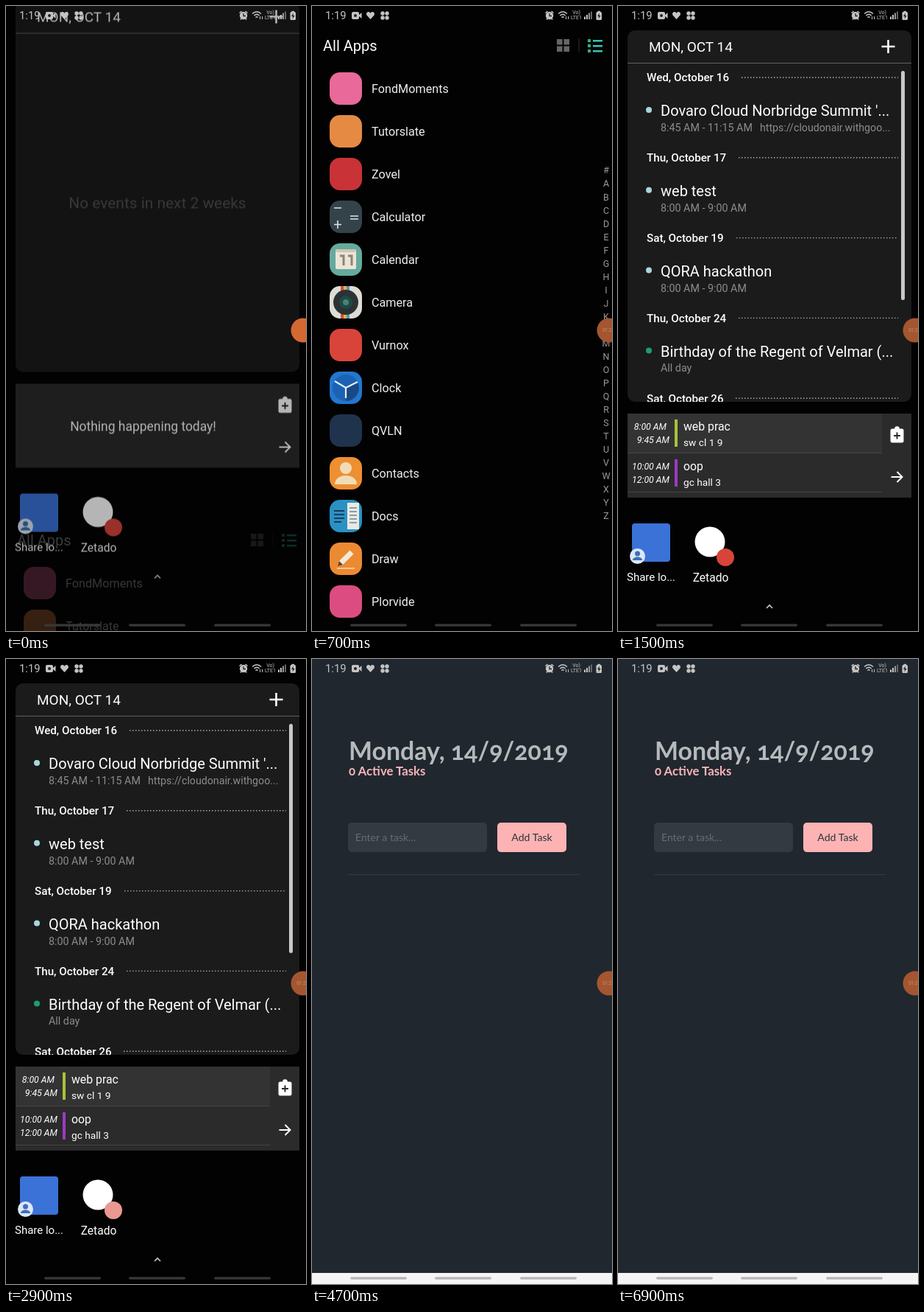
These frames come from a looping animation (408x848 px, 7100 ms). An HTML page:

```html
<!DOCTYPE html>
<html lang="en">
<head>
<meta charset="utf-8">
<style>
html, body { margin: 0; width: 100%; height: 100%; overflow: hidden; background: #030203; }
svg { display: block; width: 408px; height: 848px; font-family: Roboto, sans-serif; }
.page { font-family: Lato, sans-serif; font-variant-numeric: oldstyle-nums; }
</style>
</head>
<body>
<svg id="stage" viewBox="0 0 408 848"></svg>
<script>
const LOOP = 7100;

// Shape helpers; text is placed by the middle of its capitals.
const text = (x, y, size, str, fill = '#fff', more = '') =>
  `<text x="${x}" y="${y + size * 0.355}" font-size="${size}" fill="${fill}" ${more}>${str}</text>`;
const rect = (x, y, w, h, fill, r = 0) =>
  `<rect x="${x}" y="${y}" width="${w}" height="${h}" rx="${r}" fill="${fill}"/>`;
const dot = (x, y, r, fill) => `<circle cx="${x}" cy="${y}" r="${r}" fill="${fill}"/>`;
const line = (d, stroke, width = 1, more = '') =>
  `<path d="${d}" fill="none" stroke="${stroke}" stroke-width="${width}" ${more}/>`;
const shape = (d, fill) => `<path d="${d}" fill="${fill}"/>`;
const group = (id, body, more = '') => `<g id="${id}" ${more}>${body}</g>`;
const MIDDLE = 'text-anchor="middle"', END = 'text-anchor="end"';

// Icon art is drawn around the centre of its tile.
const apps = [
  ['FondMoments', '#e8699a'],
  ['Tutorslate', '#e58a43'],
  ['Zovel', '#c93236'],
  ['Calculator', '#34434a', line('M-16-12h10M-11 5v11M-16 10.5h10M6-1h11M6 3h11', '#dfe5e3', 1.6)],
  ['Calendar', '#65aa9d', rect(-14, -14, 28, 27, '#ece5d6', 2) + rect(-14, -14, 28, 4, '#cfc6b4', 2) +
    line('M-8-5h5V8M3-5h5V8', '#8b8478', 3)],
  ['Camera', '#dfdcd8', rect(-7, -22, 4, 44, '#d0503c') + rect(-3, -22, 4, 44, '#e4b341') +
    rect(1, -22, 4, 44, '#4c9ab5') + dot(0, 0, 17, '#2c3234') + dot(0, 0, 9, '#1d4b46') + dot(0, 0, 4, '#4a8274')],
  ['Vurnox', '#d8443a'],
  ['Clock', '#2277cf', dot(0, 0, 18, '#1c62b3') + shape('M0 0L16-8A18 18 0 0 1 0 18Z', '#174a86') +
    line('M-15-9L0 0L16-8M0 0V14', '#e5eef5', 2.2)],
  ['QVLN', '#20334d'],
  ['Contacts', '#ee8f31', dot(0, -7, 8, '#f2dcb7') + shape('M-15 15C-15-1 15-1 15 15Z', '#f2dcb7')],
  ['Docs', '#2a91c4', rect(2, -18, 16, 36, '#ece9e2') +
    line('M-16-7H-2M-16-2H-2M-16 3H-2M-16 8H-6', '#183c59', 2) +
    line('M5-11H15M5-6H15M5-1H15M5 4H15M5 9H15', '#65869a', 1.5)],
  ['Draw', '#ec8a32', line('M-7 6L8-9', '#f4ead7', 7) + shape('M-11 10L-9 3L-4 8Z', '#5b473d') +
    line('M-12 13H12', '#f6dcae', 1.5)],
  ['Plorvide', '#dc4c80'],
];

const drawer = () => {
  const rows = apps.map(([name, color, art = ''], i) => {
    const y = 112 + 58 * i;
    return `<g transform="translate(46 ${y})">${rect(-22, -22, 44, 44, color, 14)}${art}</g>` +
      text(81, y, 16.2, name, '#eee');
  });
  const tiles = [[333, 45], [342.5, 45], [333, 54.5], [342.5, 54.5]].map(([x, y]) => rect(x, y, 7.5, 7.5, '#666'));
  const list = [46, 53, 60].map(y => rect(375, y - 1, 4, 4, '#2fae8f') + rect(382, y, 13, 2.5, '#38c3b4'));
  return text(15, 54, 20, 'All Apps') + tiles.join('') + rect(362.5, 44, 1, 18, '#333') + list.join('') + rows.join('');
};

const letters = () => [...'#ABCDEFGHIJKLMNOPQRSTUVWXYZ']
  .map((c, i) => text(400, 223 + 18.04 * i, 12.5, c, '#999', MIDDLE)).join('');

const days = [
  ['Wed, October 16', 168, '#a9d5e2', "Dovaro Cloud Norbridge Summit '...", '8:45 AM - 11:15 AM',
    'https://cloudonair.withgoo...'],
  ['Thu, October 17', 164, '#a9d5e2', 'web test', '8:00 AM - 9:00 AM'],
  ['Sat, October 19', 161, '#a9d5e2', 'QORA hackathon', '8:00 AM - 9:00 AM'],
  ['Thu, October 24', 164, '#1f9d6c', 'Birthday of the Regent of Velmar (...', 'All day'],
  ['Sat, October 26', 160],
];
const agenda = () => days.map(([day, start, color, title, time, link = ''], i) => {
  const y = 97 + 108.8 * i;
  return text(39, y, 15.2, day, '#fff', 'font-weight="500"') +
    line(`M${start} ${y}H381`, '#aaa', 1.4, 'stroke-dasharray="1.5 2.5"') +
    (title ? dot(42, y + 44, 4, color) + text(58, y + 45, 20, title) +
      text(58, y + 68, 14.3, time, '#8c8c8c') + text(193, y + 68, 14.2, link, '#8c8c8c') : '');
}).join('') + rect(385, 88, 5, 311, '#c8c8c8', 2.5);

const lesson = (y, color, from, to, right, name, room) =>
  text(right, y, 12.3, from, '#fff', END + ' font-style="italic"') +
  text(70, y + 18, 12.3, to, '#fff', END + ' font-style="italic"') +
  rect(77, y - 10, 4, 37, color) + text(89, y - 1, 15.8, name) + text(89, y + 21, 13.7, room);

const today = () => rect(13, 553, 346, 54, '#333') + rect(13, 606, 346, 1, '#444') + rect(13, 659, 346, 1, '#444') +
  lesson(571, '#a6c23b', '8:00 AM', '9:45 AM', 66, 'web prac', 'sw cl 1 9') +
  lesson(625, '#9a3bc4', '10:00 AM', '12:00 AM', 70, 'oop', 'gc hall 3');

const home = () =>
  `<clipPath id="card">${rect(13, 33, 386, 504, '#000', 10)}</clipPath>` +
  rect(13, 33, 386, 504, '#1b1b1b', 10) +
  text(42, 55, 19, 'MON, OCT 14') + line('M358.5 55H376.5M367.5 46V64', '#fff', 2.6) +
  rect(13, 77, 386, 1, '#5c6266') +
  rect(13, 553, 386, 114, '#2b2b2b') +
  group('empty', text(206, 308, 20.9, 'No events in next 2 weeks', '#505050', MIDDLE) +
    text(186.5, 611, 17.45, 'Nothing happening today!', '#fff', MIDDLE)) +
  group('events', `<g clip-path="url(#card)">${agenda()}</g>` + today()) +
  rect(370.5, 573.5, 18, 19, '#fff', 2.5) + dot(379.5, 573.5, 3.3, '#fff') +
  line('M375 583H384M379.5 578.5V587.5', '#2b2b2b', 2) +
  line('M371.5 639H386M379.5 632L386.5 639L379.5 646', '#fff', 2) +
  rect(19, 702, 52, 52, '#3b72d8', 4) +
  dot(26.5, 746.5, 10.5, '#dbe8f8') + dot(26.5, 743, 3.5, '#3f6fb5') +
  shape('M20 752C20 746 33 746 33 752Z', '#3f6fb5') +
  dot(125, 727, 20.5, '#fff') + dot(146, 748, 12, '#d8443a') +
  group('press', dot(146, 748, 12, '#fff')) +
  text(45, 775, 15, 'Share lo...', '#fff', MIDDLE) + text(126, 775, 15.6, 'Zetado', '#fff', MIDDLE) +
  line('M202 817L206 813L210 817', '#ccc', 1.6);

const splash = () => rect(0, 24, 408, 809, '#212830') + rect(0, 833, 408, 15, '#f5f5f5') +
  dot(205, 412, 23.5, '#fff') + text(206, 768, 23.2, 'Zetado', '#fff', MIDDLE);

const page = () => rect(0, 0, 408, 833, '#20272e') + rect(0, 833, 408, 15, '#f5f5f5') +
  text(50, 125, 33.9, 'Monday, 14/9/2019', '#b6babd', 'font-weight="700"') +
  text(50, 152, 16.8, '0 Active Tasks', '#f8b5ba', 'font-weight="700"') +
  rect(49, 222, 189, 40, '#343a41', 5) + text(59, 242, 14, 'Enter a task...', '#666c72') +
  rect(252, 222, 94, 40, '#fdb3b4', 5) + text(299, 242, 14.1, 'Add Task', '#2d3339', MIDDLE) +
  rect(49, 292, 315, 1, '#303d4a');

const status = () => {
  const c = '#c4c4c4';
  return text(18, 13, 14.8, '1:19', c) +
    rect(54, 8, 10, 10, c, 2) + shape('M63 13L67.5 9V17Z', c) + dot(59, 13, 2, '#222') +
    shape('M79.5 18L74.5 12.5C72.5 9 77.5 6 79.5 9.7C81.5 6 86.5 9 84.5 12.5Z', c) +
    [[96, 10], [102, 10], [96, 16], [102, 16]].map(([x, y]) => dot(x, y, 2.7, c)).join('') +
    dot(323, 13, 5.2, c) + line('M323 10V13.5H326', '#222', 1.3) +
    line('M317.5 9.5L320.5 7M328.5 9.5L325.5 7M319 18.5L320 17M327 18.5L326 17', c, 1.6) +
    line('M335 10.5Q341 5 347 10.5M337.3 13Q341 9.7 344.7 13M339.4 15.5Q341 14 342.6 15.5', c, 1.5) +
    line('M345.5 14V18M348.5 14V18', c) +
    text(359.5, 9, 7, 'Vo)', c, MIDDLE) + text(359.5, 15.5, 7, 'LTE1', c, MIDDLE) +
    rect(370, 14.5, 2, 3.5, c) + rect(373, 12, 2, 6, c) + rect(376, 9.5, 2, 8.5, '#999') + rect(379, 7.5, 2, 10.5, '#666') +
    rect(386.5, 8, 7.5, 11, c, 1.5) + rect(388.5, 6.8, 3.5, 2, c) + shape('M391 9.5L388 14H390L389.5 17.5L392.7 13H390.7Z', '#222');
};

const $ = id => document.getElementById(id);
$('stage').innerHTML =
  group('drawer', drawer()) + group('letters', letters()) + group('home', home()) +
  group('splash', splash()) + group('page', page(), 'class="page"') + status() +
  group('pills', [52, 167, 283].map(x => rect(x, 838.5, 77, 3.2, 'currentColor', 1.6)).join('')) +
  group('bubble', dot(404, 440, 16.5, 'currentColor') + text(401.5, 440, 6.5, '01:2', '#c98f70', MIDDLE));

const clamp = v => Math.min(1, Math.max(0, v));
const span = (t, from, to) => clamp((t - from) / (to - from));
const easeOut = v => 1 - (1 - v) ** 3;
const mix = (a, b, v) => a + (b - a) * v;
const set = (id, opacity, transform = '') => {
  $(id).setAttribute('opacity', opacity);
  $(id).setAttribute('transform', transform);
};

function draw(t) {
  // How far the app drawer is pulled up over the home screen.
  const open = t < 950 ? mix(0.145, 1, easeOut(span(t, 0, 450))) : 1 - easeOut(span(t, 950, 1350));
  set('drawer', clamp(open * 1.5), `translate(0 ${790 * (1 - open)})`);
  set('letters', span(open, 0.7, 1));
  set('home', clamp(1 - 1.9 * open), `translate(0 ${-269 * open})`);
  set('empty', t < 900 ? 1 : 0);
  set('events', t < 900 ? 0 : 1);
  set('press', 0.45 * span(t, 2750, 2900));

  const launch = easeOut(span(t, 3000, 3350));
  const size = mix(0.12, 1, launch);
  set('splash', span(t, 3000, 3120),
    `translate(${mix(125, 204, launch)} ${mix(727, 424, launch)}) scale(${size}) translate(-204 -424)`);
  set('page', span(t, 4050, 4250));
  $('pills').style.color = t < 3200 ? '#383838' : '#b7b7b7';

  const dim = span(t, 0, 500);
  $('bubble').style.color = `rgb(${mix(211, 164, dim)}, ${mix(104, 86, dim)}, ${mix(50, 48, dim)})`;
  $('bubble').lastChild.setAttribute('opacity', dim);
}

const start = performance.now();
function tick() {
  draw((performance.now() - start) % LOOP);
  requestAnimationFrame(tick);
}
tick();
</script>
</body>
</html>
```
